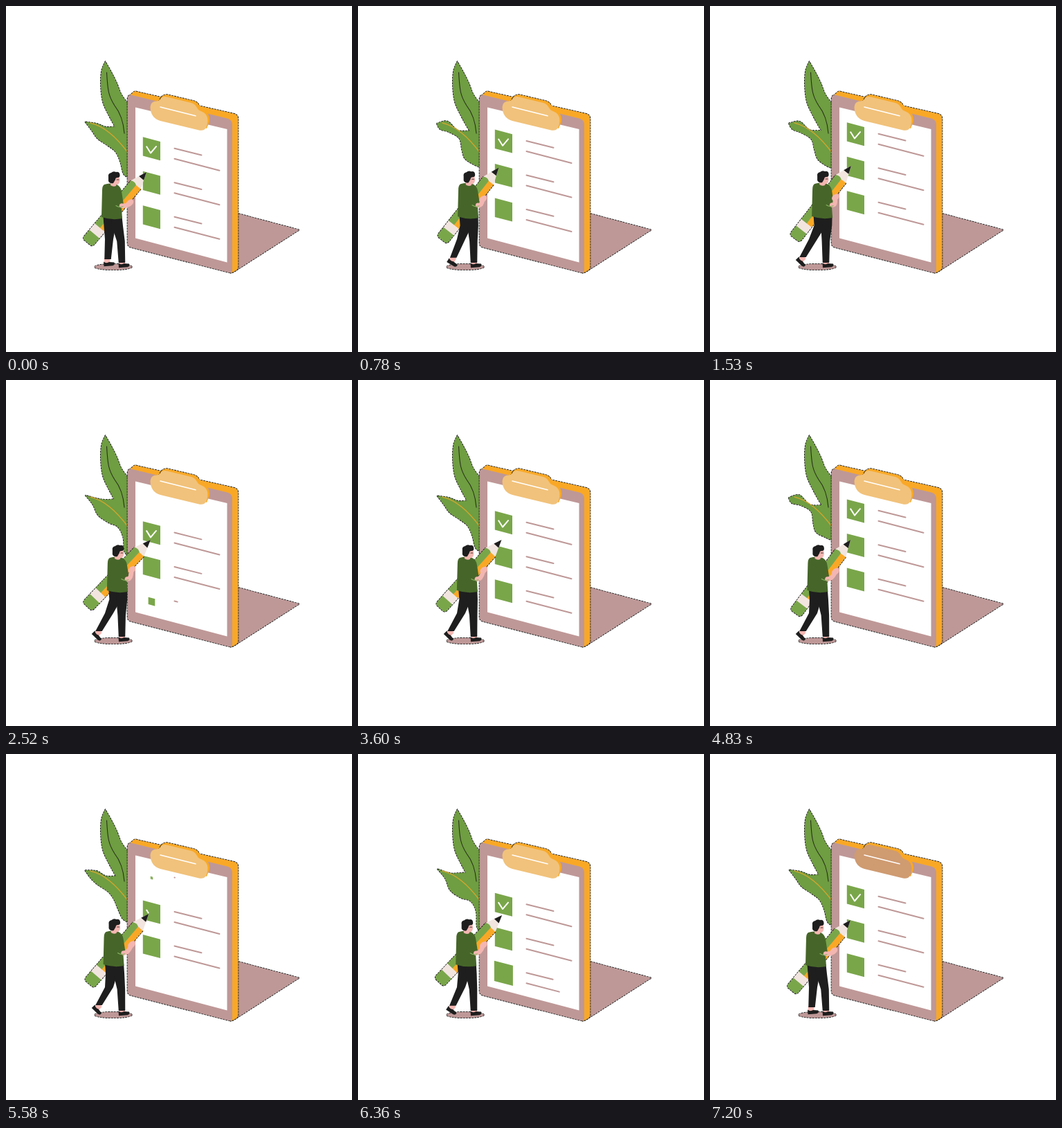
Recreate the animation shown at these times as an HTML page with a canvas. Size 500 by 500 pixels, loop 7230 ms.

```html
<!DOCTYPE html>
<html lang="en">
<head>
<meta charset="utf-8">
<title>Checklist</title>
<style>
  html, body { margin: 0; width: 100%; height: 100%; overflow: hidden; background: #fff; }
  canvas { display: block; width: 500px; height: 500px; }
</style>
</head>
<body>
<canvas id="stage" width="500" height="500"></canvas>
<script>
const ctx = document.getElementById('stage').getContext('2d');
const LOOP = 7230, CYCLE = 3600, STEP = 30, PITCH = 49.5;
const C = {
  leaf: '#6f9d41', box: '#7aa64a', shirt: '#466629', orange: '#f9a826', rose: '#be9897',
  cream: '#f2e5e0', skin: '#f3b6b1', ink: '#1e1e1e', vein: '#cda62f', clip: '#f1c27b', clipDim: '#cf9b71'
};

const ramp = (t, a, b) => Math.max(0, Math.min(1, (t - a) / (b - a)));
const ease = v => v * v * (3 - 2 * v);
const backOut = v => 1 + 2.7 * (v - 1) ** 3 + 1.7 * (v - 1) ** 2;
const mix = (a, b, k) => a + (b - a) * k;
const swing = (t, peak, period) => Math.cos(2 * Math.PI * (t - peak) / period);

function fill(shape, color) {
  ctx.fillStyle = color;
  ctx.fill(typeof shape === 'string' ? new Path2D(shape) : shape);
}

function line(shape, color, width) {
  ctx.strokeStyle = color;
  ctx.lineWidth = width;
  ctx.stroke(typeof shape === 'string' ? new Path2D(shape) : shape);
}

// thin broken contour, meant to be covered on its inner half
function edge(shape) {
  ctx.save();
  ctx.lineCap = 'butt';
  ctx.setLineDash([3, 1]);
  line(shape, '#111', 1.6);
  ctx.restore();
}

function edged(shape, color) {
  edge(shape);
  fill(shape, color);
}

function ellipse(x, y, rx, ry, rot = 0) {
  const p = new Path2D();
  p.ellipse(x, y, rx, ry, rot, 0, 2 * Math.PI);
  return p;
}

// smooth curve through [x, y] points
function spline(path, pts) {
  const pt = i => pts[Math.max(0, Math.min(pts.length - 1, i))];
  path.lineTo(...pts[0]);
  for (let i = 0; i < pts.length - 1; i++) {
    const [a, b, c, d] = [pt(i - 1), pt(i), pt(i + 1), pt(i + 2)];
    path.bezierCurveTo(b[0] + (c[0] - a[0]) / 6, b[1] + (c[1] - a[1]) / 6,
      c[0] - (d[0] - b[0]) / 6, c[1] - (d[1] - b[1]) / 6, ...c);
  }
  return path;
}

function drawLeaves(wave) {
  // resting point and how far it sways
  const sway = pts => pts.map(([x, y, dx, dy]) => [x + wave * dx, y + wave * dy]);
  const tip = [114, 168, 0.5, -2];
  const small = spline(new Path2D(), sway([tip, [122, 179, 4, 1], [132, 189, 1, 8],
    [147, 199, 1, 9], [156, 210, 7, 3], [162, 224, 9, 4], [169, 239, 3, 12], [180, 245, 0, 12]]));
  small.lineTo(182, 180);
  spline(small, sway([[159, 176, -4, -5], [144, 176, 0, -4], [131, 169, 2, 3], tip]));
  const big = spline(new Path2D(), [[166, 186], [159, 177], [149, 159], [140, 139], [137, 116], [138, 94], [143.5, 80]]);
  spline(big, [[143.5, 80], [152, 95], [160, 111], [167, 128], [180, 146]]);
  big.lineTo(182, 190);
  [small, big].forEach(edge);
  [small, big].forEach(p => fill(p, C.leaf));
  line('M145.5 96C147 122 148 130 157 144Q169 159 171 184', '#26321a', 1.1);
  line('M122 169Q149 175 177 213', C.vein, 1.3);
}

function drawBoard() {
  edged('M336 300L424 323.5L328 385Z', C.rose);
  const face = 'M175.5 135Q175.5 127 183 129L320 162.5Q327 164.5 327 172V381Q327 387 321 385L181 349Q175.5 347.5 175.5 342Z';
  const back = 'M178 130L184 124.5Q186 122.5 190 124L329 155.5Q335.5 157 335.5 163V377Q335.5 380 333 382L325 386Z';
  [face, back].forEach(edge);
  fill(back, C.orange);
  fill(face, C.rose);
  fill('M187 146.5L319.5 178V370.5L187 335.5Z', '#fff');
}

function drawItem(y, size, first, second, check) {
  ctx.save();
  ctx.translate(0, y);
  const stroke = (x, y0, dx, dy, k) => {
    if (k > 0) line(`M${x} ${y0}l${dx * k} ${dy * k}`, C.rose, 2);
  };
  stroke(243.5, 205.7, 39, 9.8, first);
  stroke(243.5, 220.7, 65, 17, second);
  ctx.translate(210.5, 206.3);
  ctx.scale(size, size);
  fill('M-12.7 -17L12.5 -10.3V17L-12.7 10.3Z', C.box);
  if (check > 0) {
    const a = ramp(check, 0, 0.42), b = ramp(check, 0.42, 1);
    line(`M-7.3 -3l${5.8 * a} ${9.2 * a}` + (b ? `l${8 * b} ${-9.4 * b}` : ''), '#fff', 2);
  }
  ctx.restore();
}

function drawList(p) {
  const y = -PITCH * p / CYCLE;
  const shrink = (a, b) => 1 - ease(ramp(p, a, b));
  const grow = (a, b) => ease(ramp(p, a, b));
  if (p < 2050) drawItem(y, shrink(1750, 2050), shrink(1700, 2000), shrink(1650, 1950), 1);
  drawItem(y + PITCH, 1, 1, 1, ramp(p, 1900, 2350));
  drawItem(y + 2 * PITCH, 1, 1, 1, 0);
  if (p > 2460) {
    drawItem(y + 3 * PITCH, backOut(ramp(p, 2460, 3110)), grow(2450, 2790), grow(2530, 2880), 0);
  }
}

function drawClip(color) {
  const back = 'M218 142L225 131Q229 127 235 128.5L271 137Q276 138 279 143L282 149L290 154Q295 158 294 167L290 177Z';
  ctx.save();
  ctx.beginPath();
  ctx.rect(200, 110, 79, 34);
  ctx.clip();
  edge(back);
  ctx.restore();
  fill(back, C.orange);
  fill('M208.5 146Q209 137.5 218 137.5Q222 137 224 133.5Q227 130 233 131.5L268 140Q273 141.5 276 147Q278 151 283 152.5Q291 155.5 291.5 165Q291 182 279 179.5L223 166Q209 162 208.5 146Z', color);
  line('M223 146L274 158.7', '#fff', 1.5);
}

function drawPencil(x, y, angle) {
  ctx.save();
  ctx.translate(x, y);
  ctx.rotate(Math.PI - angle);
  edge('M24 -9.5H128Q133 -9.5 133 -5V5Q133 9.5 128 9.5H24');
  fill('M0 0L24 -9.5V9.5Z', C.cream);
  fill('M0 0L11.5 -4.5V4.5Z', C.ink);
  fill('M24 -9.5H106V0H24Z', C.orange);
  fill('M24 -0.5H106V9.5H24Q21 4 24 -0.5Z', C.box);
  fill('M105 -9.5H118V9.5H105Z', C.cream);
  fill('M117 -9.5H128Q133 -9.5 133 -5V5Q133 9.5 128 9.5H117Z', C.box);
  ctx.restore();
}

// tapered limb through [x, y, width] points
function limb(pts) {
  const p = new Path2D();
  pts.forEach(([x, y, w]) => p.lineTo(x - w / 2, y));
  [...pts].reverse().forEach(([x, y, w]) => p.lineTo(x + w / 2, y));
  p.closePath();
  return p;
}

function drawFoot(x, y, turn) {
  ctx.save();
  ctx.translate(x, y);
  ctx.rotate(turn);
  fill('M-4 -4H4L4.5 4H-4Z', C.skin);
  fill('M-5 1.5Q-1 4.5 3 2L10.5 2.5Q12 6 8 7.3L-4.5 8.3Z', C.ink);
  ctx.restore();
}

function drawMan(t, wave) {
  // step: 0 standing upright, 1 leaning in with the heel raised
  const step = ease(ramp(t, 0, 1200)) * (1 - ease(ramp(t, 6000, 7200)));
  const dx = step * (5.7 + 3.4 * swing(t, 1500, LOOP)), dy = -step;
  const angle = mix(50, 49.4 - 3.7 * wave, step) * Math.PI / 180;
  const tipX = mix(203, 206.3 + 3.3 * wave, step), tipY = mix(240, 231, step);
  const cos = Math.cos(angle), sin = Math.sin(angle);

  edged(ellipse(155, 377, 27, 4.3), C.rose);
  drawPencil(tipX, tipY, angle);

  const footX = 146 - 13 * step, footY = 368 - 3 * step, hip = 306 + dy;
  drawFoot(footX, footY, 0.85 * step);
  drawFoot(167.5, 370, 0);
  fill(limb([[149 + dx, hip - 2, 17], [150 + dx, hip + 12, 17],
    [149, 337, 12], [footX + 1, footY - 2, 9.5]]), C.ink);
  fill(limb([[159.5 + dx, hip - 2, 16], [161 + dx * 0.8, hip + 12, 16],
    [166 + dx * 0.15, 340, 11.5], [167.5, 371, 9.5]]), C.ink);

  ctx.save();
  ctx.translate(dx, dy);
  fill('M142 258Q150 255 160 258Q166 261 167 268L170 287Q171 291 167 292L168 307Q153 310 138 305L139 266Q139 260 142 258Z', C.shirt);
  ctx.restore();

  // the hand holds the pencil from below
  const handX = tipX - 51 * cos + 10 * sin, handY = tipY + 51 * sin + 10 * cos;
  const ex = 167 + dx, ey = 288.5 + dy;
  line(`M${ex} ${ey}Q${ex + 6} ${ey + 1} ${handX} ${handY + 1}`, C.skin, 6.5);
  fill(ellipse(handX + 1, handY - 1, 6, 4.2, -0.65), C.skin);
  line(`M${ex - 8} ${ey}Q${ex - 3} ${ey + 3.5} ${ex + 2} ${ey + 1}`, '#8bb765', 1.1);

  // head
  ctx.save();
  ctx.translate(156 + dx - 2 * step, dy);
  fill('M-4 251H4L3 260Q-1 262 -5 259Z', C.skin);
  fill('M-1 246H7.5L8.5 252Q8 258 3 258.5Q-2 258 -3 253Z', C.skin);
  fill('M-8 247Q-9 242 -4 241Q-1 238 3 240Q8 239 8.5 244Q9 248 5 248Q2 248 2 251L-1 256Q-6 257 -8 253Z', C.ink);
  line('M4 251H7', C.ink, 0.8);
  ctx.restore();
}

function draw(t) {
  const phase = t % CYCLE, wave = swing(phase, 2900, CYCLE);
  ctx.fillStyle = '#fff';
  ctx.fillRect(0, 0, 500, 500);
  ctx.lineCap = ctx.lineJoin = 'round';
  drawLeaves(wave);
  drawBoard();
  drawList(phase);
  drawClip(t >= 2 * CYCLE ? C.clipDim : C.clip);
  drawMan(t, wave);
}

const start = performance.now();
function tick() {
  const t = (performance.now() - start) % LOOP;
  draw(Math.floor(t / STEP) * STEP);
  requestAnimationFrame(tick);
}
tick();
</script>
</body>
</html>
```
